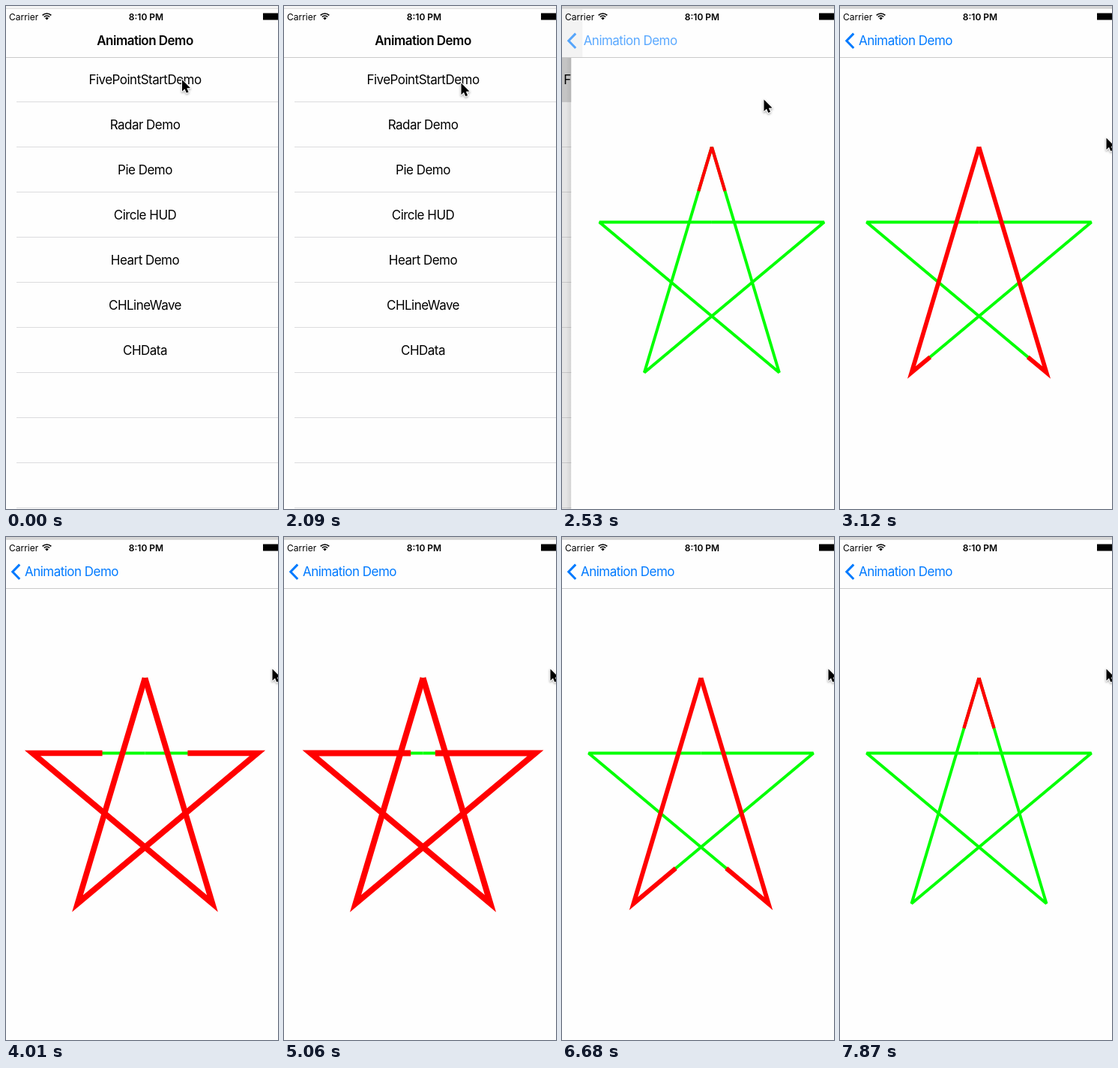
These frames come from a looping animation (363x669 px, 8 s). An HTML page with a canvas:

```html
<!DOCTYPE html>
<html lang="en">
<head>
<meta charset="utf-8">
<title>Star stroke</title>
<style>
  html, body { margin: 0; width: 100%; height: 100%; overflow: hidden; background: #fefefe; }
  canvas { display: block; }
</style>
</head>
<body>
<canvas id="stage" width="363" height="669"></canvas>
<script>
const ctx = document.getElementById('stage').getContext('2d');
const W = 363, H = 669, LOOP = 8000, SCREEN = 375, INSET = -2, MID = 185.5;
const NAV_BOTTOM = 69, ROW = 60;
const PUSH_START = 2173, STEP_START = 2090, STEP = 148.2;
const PAPER = '#fefefe', BLUE = '#007aff';
const rows = ['FivePointStartDemo', 'Radar Demo', 'Pie Demo', 'Circle HUD', 'Heart Demo', 'CHLineWave', 'CHData'];

// Half of the star, as offsets from its apex; the other half is mirrored.
const half = [[0, 0], [90, 300], [-150, 100], [0, 100]];
const halfLength = half.slice(1).reduce(
  (sum, [x, y], i) => sum + Math.hypot(x - half[i][0], y - half[i][1]), 0);

const clamp = v => Math.min(1, Math.max(0, v));
const mix = (a, b, k) => a + (b - a) * k;

// cubic-bezier(.42, 0, .58, 1)
function easeInOut(x) {
  let lo = 0, hi = 1;
  for (let i = 0; i < 20; i++) {
    const s = (lo + hi) / 2, r = 1 - s;
    if (1.26 * s * r * r + 1.74 * s * s * r + s * s * s < x) lo = s; else hi = s;
  }
  return lo * lo * (3 - 2 * lo);
}

// The stroke runs out, then back again more slowly.
function strokeProgress(t) {
  const x = (t - 2380) / 1000;
  const u = t < 4630 ? 0.12 + 0.503 * x - 0.0497 * x * x : 1 - (t - 4630) / 4100;
  return easeInOut(clamp(u));
}

function pushProgress(t) {
  const x = Math.max(0, t - PUSH_START) * 0.014;
  const q = 1 - (1 + x) * Math.exp(-x);
  return q > 0.997 ? 1 : q;
}

function rect(x, y, w, h, color) {
  ctx.fillStyle = color;
  ctx.fillRect(x, y, w, h);
}

function text(str, x, y, { size = 17, weight = 400, color = '#000', align = 'center', spacing = -0.52 } = {}) {
  ctx.font = `${weight} ${size}px Inter, sans-serif`;
  ctx.letterSpacing = spacing + 'px';
  ctx.textAlign = align;
  ctx.fillStyle = color;
  ctx.fillText(str, x, y);
}

function line(points, color, width) {
  ctx.beginPath();
  points.forEach(([x, y]) => ctx.lineTo(x, y));
  ctx.strokeStyle = color;
  ctx.lineWidth = width;
  ctx.stroke();
}

function drawList(shift, selected) {
  ctx.save();
  ctx.translate(shift, 0);
  if (selected) rect(0, NAV_BOTTOM, SCREEN + 120, ROW - 1, '#d9d9d9');
  for (let i = 0; i < 10; i++) {
    if (rows[i]) text(rows[i], MID, 103.7 + i * ROW);
    rect(14, 127 + i * ROW, SCREEN + 120, 1, '#dcdcde');
  }
  ctx.restore();
}

function drawStar(p) {
  ctx.save();
  ctx.translate(MID, 187.5);
  for (const [color, width, length, join] of [
    ['#0f0', 4, halfLength, 'bevel'],
    ['#f00', 4 + 4 * p, halfLength * p, 'miter'],
  ]) {
    if (length <= 0) continue;
    ctx.lineJoin = join;
    ctx.setLineDash([length, 2 * halfLength]);
    for (const side of [1, -1]) line(half.map(([x, y]) => [x * side, y]), color, width);
  }
  ctx.restore();
}

function drawNav(t, q, edge) {
  rect(0, 0, W, NAV_BOTTOM, PAPER);
  if (q > 0 && q < 1) rect(0, 4, edge + 15, 64, 'rgba(0,0,0,.045)');
  rect(0, 0, W, 3, q ? '#d5d5d5' : '#f4f4f4');
  rect(0, 3, W, 1, '#dcdcdc');
  rect(0, 68, W, 1, '#cacaca');

  ctx.globalAlpha = clamp(1 - q * 1.15);
  text('Animation Demo', mix(MID, 88, q), 52, { weight: 600 });
  if (q) {
    ctx.globalAlpha = clamp((t - 2340) / 300);
    const color = t < 2450 ? '#3a78b4' : BLUE;
    text('Animation Demo', mix(120, 25, q), 52, { color, align: 'left' });
    line([[18.2, 36.6], [8.8, 46.3], [18.2, 56]], BLUE, 3);
  }
  ctx.globalAlpha = 1;
}

function drawStatus() {
  text('Carrier', 4, 18.5, { size: 12, align: 'left', spacing: 0 });
  text('8:10 PM', 187, 18.5, { size: 12, weight: 600, spacing: 0 });
  ctx.strokeStyle = '#000';
  ctx.lineWidth = 1.7;
  for (const r of [8.2, 5.2]) {
    ctx.beginPath();
    ctx.arc(54.5, 18.2, r, -Math.PI * 0.75, -Math.PI * 0.25);
    ctx.stroke();
  }
  ctx.beginPath();
  ctx.moveTo(54.5, 18.5);
  ctx.arc(54.5, 18.5, 3.2, -Math.PI * 0.75, -Math.PI * 0.25);
  ctx.fillStyle = '#000';
  ctx.fill();
  rect(343, 9.5, 20, 9, '#000');
}

function cursorAt(t) {
  if (t < 750) return [235, 98];
  if (t < 900) return [235.5, 100];
  if (t < 2200) return [236.5, 102.5];
  if (t < 2386) return [mix(236.5, 243.5, (t - 2200) / 186), mix(102.5, 109, (t - 2200) / 186)];
  const k = clamp((t - 2386) / 640);
  return [mix(243.5, 355.5, k), mix(109, 175.5, k)];
}

function drawCursor([x, y]) {
  ctx.save();
  ctx.translate(x, y);
  ctx.beginPath();
  for (const [px, py] of [[0, 0], [0, 15.5], [3.5, 12.3], [5.8, 17.6], [8.6, 16.4], [6.3, 11.2], [11, 11]]) {
    ctx.lineTo(px, py);
  }
  ctx.closePath();
  ctx.shadowColor = 'rgba(0,0,0,.35)';
  ctx.shadowBlur = 3;
  ctx.shadowOffsetY = 1.5;
  ctx.lineJoin = 'round';
  ctx.lineWidth = 2;
  ctx.strokeStyle = '#fff';
  ctx.stroke();
  ctx.shadowColor = 'transparent';
  ctx.fillStyle = '#000';
  ctx.fill();
  ctx.restore();
}

function draw(time) {
  const t = time < STEP_START ? time
    : STEP_START + Math.floor((time + 8 - STEP_START) / STEP) * STEP;
  const q = pushProgress(t);
  const offset = SCREEN * (1 - q), edge = INSET + offset;

  rect(0, 0, W, H, PAPER);
  if (q < 1) drawList(-0.3 * SCREEN * q, q > 0);
  if (q > 0) {
    rect(0, NAV_BOTTOM, edge, H, `rgba(0,0,0,${0.1 * q})`);
    if (q < 1) {
      const shade = ctx.createLinearGradient(edge - 7, 0, edge, 0);
      shade.addColorStop(0, 'rgba(0,0,0,0)');
      shade.addColorStop(1, 'rgba(0,0,0,.08)');
      rect(edge - 7, NAV_BOTTOM, 7, H, shade);
    }
    ctx.save();
    ctx.translate(offset, 0);
    rect(INSET, NAV_BOTTOM, SCREEN, H, PAPER);
    drawStar(strokeProgress(t));
    ctx.restore();
  }
  drawNav(t, q, edge);
  drawStatus();
  drawCursor(cursorAt(t));
}

const start = performance.now();
function tick() {
  draw((performance.now() - start) % LOOP);
  requestAnimationFrame(tick);
}
tick();
</script>
</body>
</html>
```
